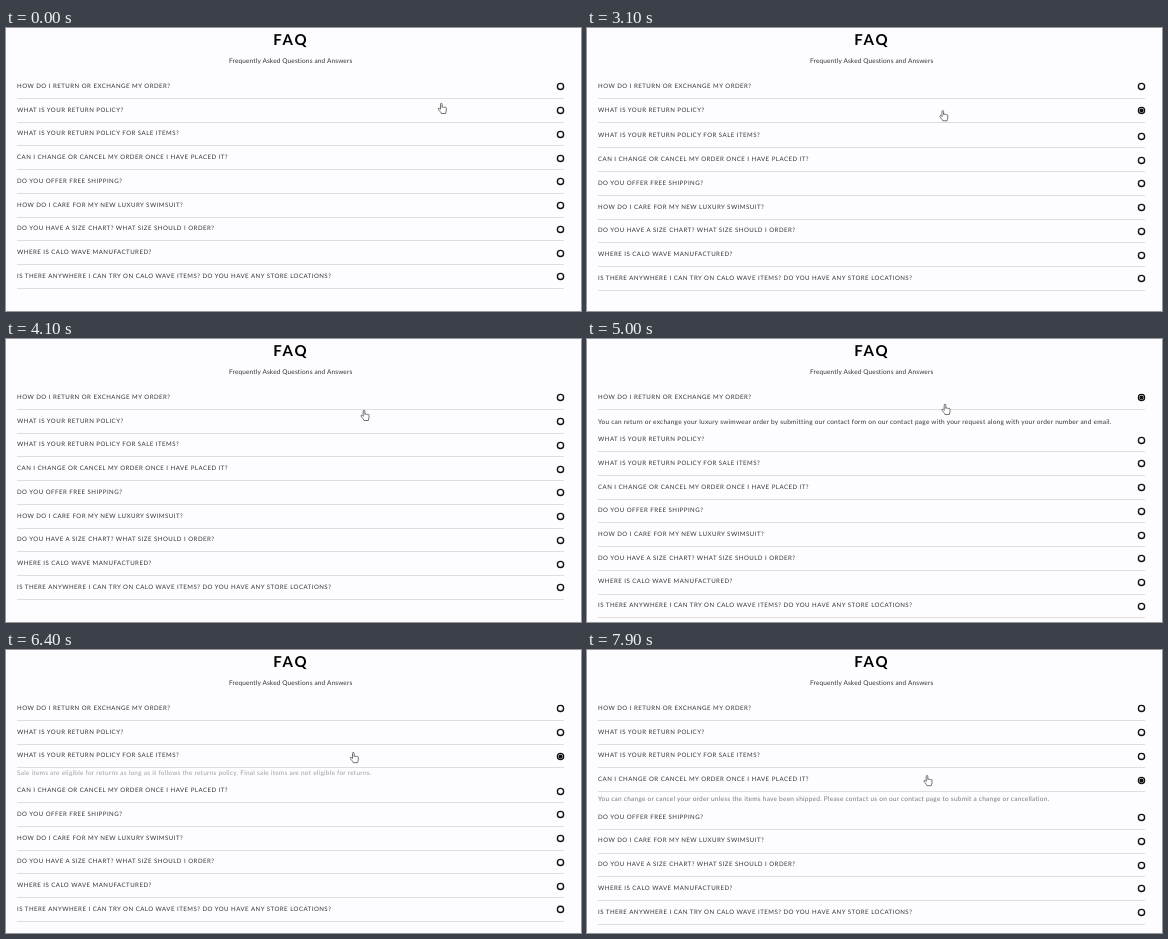
Recreate the animation shown at these times as an HTML page. Size 575 by 283 pixels, loop 8000 ms.

```html
<!DOCTYPE html>
<html lang="en">
<head>
<meta charset="utf-8">
<title>FAQ</title>
<style>
  html, body { margin: 0; width: 100%; height: 100%; overflow: hidden; background: #fdfcfe; }
  body { position: relative; font-family: Lato, "Open Sans", sans-serif; color: #343335; text-rendering: geometricPrecision; }
  #stage { position: absolute; left: 0; top: 0; width: 575px; height: 283px; overflow: hidden; }
  #stage * { position: absolute; white-space: pre; }
  h1 { margin: 0; left: 267.3px; top: 2px; font-size: 15px; font-weight: 700; line-height: 20px; letter-spacing: 1.7px; color: #000; }
  .sub { left: 223px; top: 28px; font-size: 6.5px; line-height: 11px; letter-spacing: .14px; }
  .row { left: 11px; width: 547px; height: 24px; }
  .label { left: 0; top: 6.5px; font-size: 6.1px; line-height: 11px; letter-spacing: .48px; }
  .rule { left: 0; top: 23.6px; width: 547px; height: 1px; background: #dfdde0; }
  .row svg { left: 538px; top: 7px; overflow: visible; }
  .answer { left: 11px; width: 555px; overflow: hidden; }
  .answer div { left: 0; font-size: 6.5px; line-height: 10.9px; letter-spacing: .24px; }
  #hand { left: 0; top: 0; overflow: visible; }
</style>
</head>
<body>
<div id="stage">
  <h1>FAQ</h1>
  <div class="sub">Frequently Asked Questions and Answers</div>
  <svg id="hand" width="1" height="1">
    <path fill="#fff" stroke="#444" stroke-width=".75" stroke-linejoin="round"
      d="M-1.8 1V-4.2a.8.8 0 0 1 1.6 0V-1c.1-.7 1.4-.7 1.5.1 .2-.6 1.3-.5 1.4.2 .3-.5 1.3-.3 1.3.6V2.2c0 1.2-.7 1.6-.7 3H-1C-1.2 4-3.2 2.4-3.9.9c-.4-.9.6-1.5 1.2-.8z"/>
  </svg>
</div>
<script>
const LOOP = 8000, STEP = 100;
const TOP = 46.4, PITCH = 23.74, LINE = 10.9;

// Each item: question, answer, [open start, open time, close start, close time]
const items = [
  ["How do I return or exchange my order?",
   "You can return or exchange your luxury swimwear order by submitting our contact form on our contact page with your request along with your order number and email.",
   [4450, 500, 5360, 400]],
  ["What is your return policy?",
   "We will accept unworn swimwear bought from CaloWave.com in new condition, with tags and hygiene liners attached within 30 days of purchase for an exchange or store credit\n" +
   "only. Please note all items marked final sale are not eligible for an exchange or store credit. Once we receive and approve your returned items, we will process your exchange\n" +
   "and/or send your store credit. For sanitary reasons, please try on all swimwear over underwear.",
   [3050, 350, 3660, 400]],
  ["What is your return policy for sale items?",
   "Sale items are eligible for returns as long as it follows the returns policy. Final sale items are not eligible for returns.",
   [6118, 500, 6760, 400]],
  ["Can I change or cancel my order once I have placed it?",
   "You can change or cancel your order unless the items have been shipped. Please contact us on our contact page to submit a change or cancellation.",
   [7565, 500, 9000, 400]],
  ["Do you offer free shipping?"],
  ["How do I care for my new luxury swimsuit?"],
  ["Do you have a size chart? What size should I order?"],
  ["Where is Calo Wave manufactured?"],
  ["Is there anywhere I can try on Calo Wave items? Do you have any store locations?"]
];

// Pointer path: time, x, y
const path = [
  [0, 436.3, 80.3], [100, 476, 30], [200, 530, 12], [300, 561, 90], [400, 540, 190],
  [500, 460, 241], [600, 350, 225], [700, 276, 160], [800, 290, 95], [900, 365, 85],
  [1000, 364.5, 84], [1600, 364.5, 84], [2000, 356.8, 87.6], [3800, 356.8, 87.6],
  [4100, 359, 76.3], [4300, 359, 70.3], [5600, 359, 70.3], [6000, 348.3, 107.5],
  [7100, 348.3, 107.5], [7500, 341, 130.5], [LOOP, 341, 130.5]
];

const stage = document.getElementById("stage");
const hand = document.getElementById("hand");

function add(parent, cls, text = "") {
  const el = document.createElement("div");
  el.className = cls;
  el.textContent = text;
  parent.insertBefore(el, parent === stage ? hand : null);
  return el;
}

const rows = items.map(([question, answer, times]) => {
  const row = add(stage, "row");
  add(row, "label", question.toUpperCase());
  add(row, "rule");
  row.insertAdjacentHTML("beforeend",
    '<svg width="10" height="10"><circle cx="5.5" cy="5.4" r="3.1" fill="none" stroke="#111" stroke-width="1.35"/>' +
    '<circle class="dot" cx="5.5" cy="5.4" r="2" fill="#111"/></svg>');
  const item = { row, times, dot: row.querySelector(".dot") };
  if (answer) {
    item.box = add(stage, "answer");
    item.text = add(item.box, "", answer);
    item.full = 18.4 + LINE * (answer.split("\n").length - 1);
  }
  return item;
});

function swing(t, start, time) {
  const u = Math.min(1, Math.max(0, (t - start) / time));
  return 0.5 - Math.cos(Math.PI * u) / 2;
}

function pointer(t) {
  const i = path.findIndex(p => p[0] > t);
  const [t0, x0, y0] = path[i - 1], [t1, x1, y1] = path[i];
  const u = (t - t0) / (t1 - t0);
  return [x0 + (x1 - x0) * u, y0 + (y1 - y0) * u];
}

function draw(t) {
  let y = TOP;
  for (const { row, times, dot, box, text, full } of rows) {
    row.style.top = y + "px";
    let shift = 0, on = false;
    if (box) {
      const closed = swing(t, times[2], times[3]);
      const s = swing(t, times[0], times[1]) - closed;
      on = s > 0.001 && closed < 0.1;
      shift = full * s;
      const moving = s < 0.95;
      box.style.top = y + PITCH + 1 + "px";
      box.style.height = Math.max(0, shift + (moving ? -3.3 : 3)) + "px";
      text.style.top = 7.5 - (full - shift) + "px";
      text.style.opacity = moving ? s ** 1.5 : 1;
    }
    dot.style.display = on ? "" : "none";
    y += PITCH + shift;
  }
  const [px, py] = pointer(t);
  hand.style.transform = `translate(${px}px, ${py}px)`;
}

const begin = performance.now();
function tick() {
  const t = (performance.now() - begin) % LOOP;
  draw(Math.floor(t / STEP) * STEP);
  requestAnimationFrame(tick);
}
draw(0);
requestAnimationFrame(tick);
</script>
</body>
</html>
```
